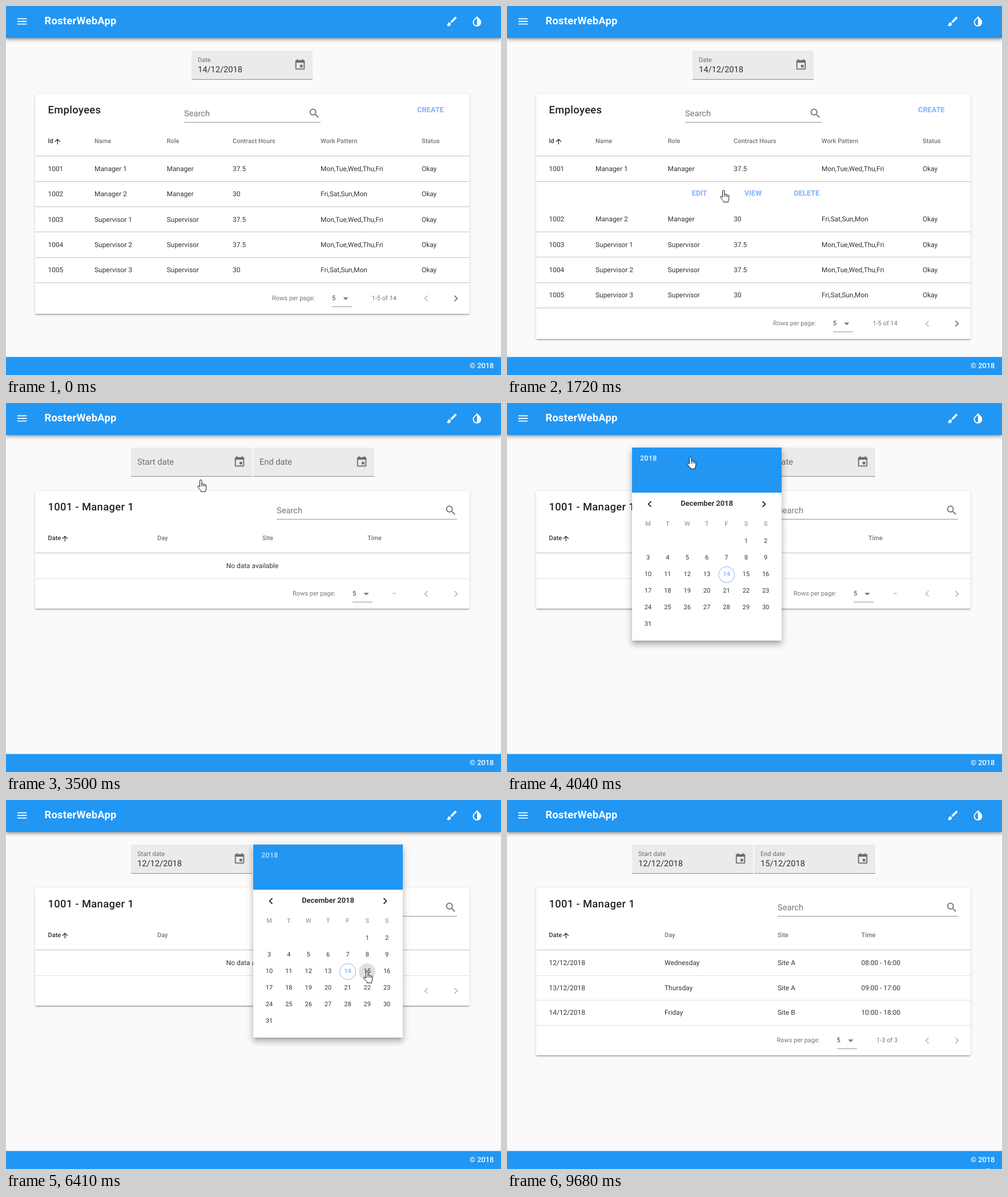
Animation of 867x646 px, one loop 9740 ms. Source, as an HTML page:

```html
<!DOCTYPE html>
<html lang="en">
<head>
<meta charset="utf-8">
<title>RosterWebApp</title>
<style>
  html, body { margin: 0; width: 100%; height: 100%; overflow: hidden; background: #fafafa; }
  #stage { position: relative; width: 867px; height: 646px; overflow: hidden; font-family: Roboto, sans-serif; color: rgba(0,0,0,.8); text-rendering: geometricPrecision; }
  #stage div, #stage svg { position: absolute; }
  .layer { left: 0; top: 0; width: 867px; height: 646px; }
  .text { white-space: pre; line-height: 20px; height: 20px; }
  .bar { background: #2196f3; }
  .top { box-shadow: 0 2px 4px -1px rgba(0,0,0,.26), 0 4px 5px rgba(0,0,0,.16), 0 1px 10px rgba(0,0,0,.12); }
  .bottom { box-shadow: inset 0 1px #86c4f7; }
  .card { background: #fff; border-radius: 2px; box-shadow: 0 3px 1px -2px rgba(0,0,0,.2), 0 2px 2px rgba(0,0,0,.14), 0 1px 5px rgba(0,0,0,.12); }
  .field { background: #ebebeb; border-radius: 4px 4px 0 0; box-shadow: inset 0 -1px #8b8b8b; }
  .picker { background: #fff; border-radius: 2px; transform-origin: 0 0; box-shadow: 0 5px 5px -3px rgba(0,0,0,.2), 0 8px 10px 1px rgba(0,0,0,.14), 0 3px 14px 2px rgba(0,0,0,.12); }
  .title { font-size: 18.33px; font-weight: 500; letter-spacing: .02em; color: rgba(0,0,0,.87); }
  .brand { font-size: 18.33px; font-weight: 700; letter-spacing: .015em; }
  .input { font-size: 14.67px; }
  .button { font-size: 12.83px; font-weight: 700; }
  .note { font-size: 12.83px; font-weight: 500; }
  .cell { font-size: 11.92px; }
  .small { font-size: 11px; }
  .head { font-size: 11px; font-weight: 500; }
  .muted { color: rgba(0,0,0,.54); }
  .faint { color: rgba(0,0,0,.38); }
  .accent { color: #82b1ff; }
  .white { color: #fff; }
  .mid { transform: translateX(-50%); }
  .clip { overflow: hidden; }
  .today { box-sizing: border-box; border: 1px solid #82b1ff; border-radius: 50%; }
  .spot { background: #e0e0e0; border-radius: 50%; }
</style>
</head>
<body>
<div id="stage"></div>
<script>
const LOOP = 9740;
const DARK = 'rgba(0,0,0,.87)', GREY = 'rgba(0,0,0,.54)', PALE = 'rgba(0,0,0,.26)';
const ICONS = {
  menu: 'M3 18h18v-2H3v2zm0-5h18v-2H3v2zm0-7v2h18V6H3z',
  brush: 'M7 14c-1.66 0-3 1.34-3 3 0 1.31-1.16 2-2 2 .92 1.22 2.49 2 4 2 2.21 0 4-1.79 4-4 0-1.66-1.34-3-3-3zm13.71-9.37l-1.34-1.34c-.39-.39-1.02-.39-1.41 0L9 12.25 11.75 15l8.96-8.96c.39-.39.39-1.02 0-1.41z',
  invert: 'M17.66 7.93L12 2.27 6.34 7.93c-3.12 3.12-3.12 8.19 0 11.31C7.9 20.8 9.95 21.58 12 21.58c2.05 0 4.1-.78 5.66-2.34 3.12-3.12 3.12-8.19 0-11.31zM12 19.59c-1.6 0-3.11-.62-4.24-1.76C6.62 16.69 6 15.19 6 13.59s.62-3.11 1.76-4.24L12 5.1v14.49z',
  event: 'M17 12h-5v5h5v-5zM16 1v2H8V1H6v2H5c-1.11 0-1.99.9-1.99 2L3 19c0 1.1.89 2 2 2h14c1.1 0 2-.9 2-2V5c0-1.1-.9-2-2-2h-1V1h-2zm3 18H5V8h14v11z',
  search: 'M15.5 14h-.79l-.28-.27C15.41 12.59 16 11.11 16 9.5 16 5.91 13.09 3 9.5 3S3 5.91 3 9.5 5.91 16 9.5 16c1.61 0 3.09-.59 4.23-1.57l.27.28v.79l5 4.99L20.49 19l-4.99-5zm-6 0C7.01 14 5 11.99 5 9.5S7.01 5 9.5 5 14 7.01 14 9.5 11.99 14 9.5 14z',
  up: 'M4 12l1.41 1.41L11 7.83V20h2V7.83l5.58 5.59L20 12l-8-8-8 8z',
  left: 'M15.41 7.41L14 6l-6 6 6 6 1.41-1.41L10.83 12z',
  right: 'M10 6L8.59 7.41 13.17 12l-4.58 4.59L10 18l6-6z',
  drop: 'M7 10l5 5 5-5z'
};

// ---- building blocks ----
const stage = document.getElementById('stage');

function box(parent, x, y, w, h, cls = '', background = '') {
  const el = document.createElement('div');
  el.className = cls;
  Object.assign(el.style, { left: x + 'px', top: y + 'px', width: w + 'px', height: h + 'px', background });
  return parent.appendChild(el);
}
function layer(parent) {
  return box(parent, 0, 0, 867, 646, 'layer');
}
function text(parent, x, cy, str, cls) {
  const el = document.createElement('div');
  el.className = 'text ' + cls;
  el.textContent = str;
  el.style.left = x + 'px';
  el.style.top = cy - 10 + 'px';
  return parent.appendChild(el);
}
function svg(parent, x, y, w, h, viewBox, content) {
  const el = document.createElementNS('http://www.w3.org/2000/svg', 'svg');
  el.setAttribute('viewBox', viewBox);
  el.innerHTML = content;
  Object.assign(el.style, { left: x + 'px', top: y + 'px', width: w + 'px', height: h + 'px', overflow: 'visible' });
  return parent.appendChild(el);
}
function icon(parent, name, cx, cy, fill, size = 22) {
  return svg(parent, cx - size / 2, cy - size / 2, size, size, '0 0 24 24', `<path d="${ICONS[name]}" fill="${fill}"/>`);
}
function line(parent, y, alpha, x = 51, w = 761) {
  return box(parent, x, y, w, 1, '', `rgba(0,0,0,${alpha})`);
}
function searchBox(parent, x, right) {
  text(parent, x, 188, 'Search', 'input muted');
  line(parent, 203, .42, x, right - x);
  icon(parent, 'search', right - 11, 188, GREY);
}
function dateField(parent, x, label, value) {
  box(parent, x, 78, 211.5, 51, 'field');
  icon(parent, 'event', x + 190, 103, GREY);
  const filled = layer(parent), empty = layer(parent);
  text(filled, x + 11, 95, label, 'small muted');
  text(filled, x + 11, 111, value, 'input');
  text(empty, x + 11, 103, label, 'input muted');
  return has => { show(filled, has); show(empty, !has); };
}
function footer(parent, x, cy, range, nextColor) {
  text(parent, x, cy, 'Rows per page:', 'small muted');
  text(parent, x + 105, cy, '5', 'small');
  line(parent, cy + 14, .42, x + 105, 35);
  icon(parent, 'drop', x + 129, cy, GREY);
  text(parent, x + 174.5, cy, range, 'small muted');
  icon(parent, 'left', 735.5, cy, PALE);
  icon(parent, 'right', 788, cy, nextColor);
}
function header(parent, columns, names) {
  names.forEach((name, i) => text(parent, columns[i], 237, name, i ? 'head muted' : 'head'));
  icon(parent, 'up', names[0] === 'Id' ? 90 : 103, 237, DARK, 14.67);
}
function row(parent, columns, y, cells, height) {
  const back = box(parent, 51, y, 761, height);
  cells.forEach((cell, i) => text(parent, columns[i], y + 22, cell, 'cell'));
  return { back, y, height };
}
function show(el, on) {
  el.style.display = on ? '' : 'none';
}

// ---- employees page ----
const employees = layer(stage);
dateField(employees, 325, 'Date', '14/12/2018')(true);
const staffCard = box(employees, 51, 154, 761, 385, 'card');
text(employees, 73.5, 183, 'Employees', 'title');
text(employees, 720, 183, 'CREATE', 'button accent');
searchBox(employees, 312, 551);
const staffColumns = [73.5, 155, 281.5, 397, 551, 728];
header(employees, staffColumns, ['Id', 'Name', 'Role', 'Contract Hours', 'Work Pattern', 'Status']);
line(employees, 262, .24);

const lower = layer(employees);
const staffRows = ['Manager 1', 'Manager 2', 'Supervisor 1', 'Supervisor 2', 'Supervisor 3'].map((name, i) => {
  const short = i === 1 || i === 4;
  const group = i ? lower : employees;
  const cells = [String(1001 + i), name, name.slice(0, -2), short ? '30' : '37.5',
    short ? 'Fri,Sat,Sun,Mon' : 'Mon,Tue,Wed,Thu,Fri', 'Okay'];
  const item = row(group, staffColumns, 263 + Math.round(44.3 * i), cells, 44);
  line(group, Math.round(262.3 + 44.35 * (i + 1)), .24);
  return item;
});
footer(lower, 466, 512, '1-5 of 14', GREY);

const actions = box(employees, 51, 308, 761, 0, 'clip');
[['EDIT', 337], ['VIEW', 431], ['DELETE', 525]].forEach(([name, cx]) => text(actions, cx - 51, 21, name, 'button accent mid'));

// ---- roster page ----
const roster = layer(stage);
const setStart = dateField(roster, 219, 'Start date', '12/12/2018');
const setEnd = dateField(roster, 433, 'End date', '15/12/2018');
const rosterCard = box(roster, 51, 154, 761, 206, 'card');
text(roster, 73.5, 183, '1001 - Manager 1', 'title');
searchBox(roster, 474, 790);
line(roster, 262, .24);
const rosterHeads = ['Date', 'Day', 'Site', 'Time'];

const blank = layer(roster);
header(blank, [73.5, 265, 449, 633], rosterHeads);
text(blank, 431.5, 285, 'No data available', 'cell mid');
line(blank, 307, .12);
footer(blank, 502, 334, '–', PALE);

const shifts = layer(roster);
const shiftColumns = [73.5, 276, 474, 620.5];
header(shifts, shiftColumns, rosterHeads);
const shiftRows = [['Wednesday', 'Site A'], ['Thursday', 'Site A'], ['Friday', 'Site B']].map(([day, site], i) => {
  const hour = n => String(n + i).padStart(2, '0') + ':00';
  const item = row(shifts, shiftColumns, 263 + Math.round(43.7 * i), [`${12 + i}/12/2018`, day, site, `${hour(8)} - ${hour(16)}`], 44);
  line(shifts, Math.round(306.8 + 43.6 * i), .12);
  return item;
});
footer(shifts, 472.5, 421, '1-3 of 3', PALE);

// ---- date pickers ----
function datePicker(x) {
  const el = box(stage, x, 78, 262, 338, 'picker');
  box(el, 0, 0, 262, 79, 'bar');
  const year = text(el, 14, 20, '2018', 'button white');
  icon(el, 'left', 30.5, 99, DARK);
  icon(el, 'right', 231, 99, DARK);
  text(el, 131, 99, 'December 2018', 'button mid');
  const colX = c => 28 + 34.35 * c;
  [...'MTWTFSS'].forEach((d, c) => text(el, colX(c), 134, d, 'head faint mid'));
  const spot = box(el, 0, 0, 29, 29, 'spot');
  const days = Array.from({ length: 31 }, (_, i) => {
    const cell = i + 5, cx = colX(cell % 7), cy = 164 + 29 * Math.floor(cell / 7);
    const today = i === 13;
    if (today) box(el, cx - 14.5, cy - 14.5, 29, 29, 'today');
    text(el, cx, cy, String(i + 1), today ? 'head accent mid' : 'small mid');
    return [cx, cy];
  });
  return (opacity, scale, yearOpacity, tip) => {
    show(el, opacity > 0);
    el.style.opacity = opacity;
    el.style.transform = scale < 1 ? `scale(${scale})` : 'none';
    year.style.opacity = yearOpacity;
    const day = days.find(([cx, cy]) => Math.hypot(tip.x - x - cx, tip.y - 78 - cy) < 14);
    show(spot, day);
    if (day) Object.assign(spot.style, { left: day[0] - 14.5 + 'px', top: day[1] - 14.5 + 'px' });
  };
}
const setStartPicker = datePicker(219);
const setEndPicker = datePicker(433);

// ---- app bars and cursors ----
box(stage, 0, 0, 867, 56, 'bar top');
icon(stage, 'menu', 28, 27.3, '#fff');
text(stage, 67.5, 27, 'RosterWebApp', 'brand white');
icon(stage, 'brush', 781, 27.3, '#fff');
icon(stage, 'invert', 824.5, 27.3, '#fff');
box(stage, 0, 614, 867, 32, 'bar bottom');
text(stage, 812, 631, '© 2018', 'note white');
const edge = box(stage, 839, 645, 8, 1, '', '#9fcff6');

const ink = 'fill="#fff" stroke="#111" stroke-linejoin="round"';
const arrow = svg(stage, 0, 0, 11, 17, '0 0 11 17', `<path ${ink} d="M.5.5V14.5L3.7 11.5 6 16.6 8.2 15.6 6 10.7H10.4z"/>`);
const hand = svg(stage, -6, 0, 16, 22, '0 0 16 22',
  `<path ${ink} d="M4.5 13V2.2a1.7 1.7 0 0 1 3.4 0V8a1.6 1.6 0 0 1 3 .6 1.5 1.5 0 0 1 2.6.7 1.4 1.4 0 0 1 2.3 1.2v4.2c0 2-1.2 3-1.2 4.6v1.9H6.4v-1.6C4 16.9 1.6 14.6.8 12.4.4 11.2 2 10.4 2.9 11.3z"/>
   <path stroke="#111" fill="none" d="M7.9 8v4M10.9 9v3M13.5 10v2.5"/>`);

// ---- timing ----
// [first step, last step, number of steps]; the picture holds still in between
const BURSTS = [[300, 690, 6], [850, 1160, 5], [1480, 1860, 6], [2090, 2400, 5], [2640, 2870, 4], [3190, 4120, 13],
  [4210, 4600, 6], [4760, 5710, 13], [5770, 6410, 9], [6870, 7190, 5], [7380, 7980, 9], [8360, 8510, 3], [8900, 9280, 6], [9680, 9680, 1]];

// [time, x, y]
const CURSOR = [[300, 694, 574], [690, 423, 287], [1400, 423, 287], [1630, 349, 318], [1860, 437, 330],
  [3110, 437, 330], [3580, 321, 94], [4130, 321, 94], [4600, 320, 309], [4920, 320, 309], [5230, 489, 113],
  [5850, 489, 113], [6410, 632, 299], [7300, 632, 299], [7540, 560, 289], [7980, 411, 379],
  [8285, 411, 379], [8510, 416, 482], [8820, 416, 482], [9204, 842, 620]];

const YEAR_GLOW = [[3960, .6], [4120, .95], [4210, .95], [4290, .6]];

function stepTime(t) {
  const burst = BURSTS.filter(b => b[0] <= t).pop();
  if (!burst) return 0;
  const [start, end, count] = burst;
  if (t >= end) return end;
  const gap = (end - start) / (count - 1);
  return start + Math.floor((t - start + 5) / gap) * gap;
}
function track(keys, t, column = 1) {
  const next = keys.findIndex(k => k[0] > t);
  if (next < 0) return keys[keys.length - 1][column];
  if (next === 0) return keys[0][column];
  const a = keys[next - 1], b = keys[next];
  return a[column] + (b[column] - a[column]) * (t - a[0]) / (b[0] - a[0]);
}
const progress = (t, from, to) => Math.min(1, Math.max(0, (t - from) / (to - from)));
const easeOut = (t, from, to) => 1 - (1 - progress(t, from, to)) ** 3;

function hover(rows, tip, shift, on) {
  rows.forEach(({ back, y, height }, i) => {
    const d = tip.y - y - (i ? shift : 0);
    back.style.background = on && d >= 0 && d < height ? '#eee' : '';
  });
}
function place(page, opacity, x) {
  show(page, opacity > 0);
  page.style.opacity = opacity;
  page.style.transform = x ? `translateX(${x}px)` : 'none';
}

function render(now) {
  const t = stepTime(now);
  const tip = { x: track(CURSOR, t, 1), y: track(CURSOR, t, 2) };
  const visible = t >= 300 && t < 9270;

  const open = Math.round(44 * (1 - (1 - progress(t, 773, 1160)) ** 1.45));
  staffCard.style.height = 385 + open + 'px';
  actions.style.height = open + 'px';
  lower.style.top = open + 'px';
  hover(staffRows, tip, open, visible && t < 2090);

  const leave = easeOut(t, 2012, 2400);
  place(employees, t < 2640 ? 1 - .985 * leave : 0, -13.75 * leave);
  const enter = easeOut(t, 2563, 2870);
  place(roster, enter, -13.75 * (1 - enter));

  const loaded = t >= 6870;
  setStart(t >= 4760);
  setEnd(loaded);
  show(blank, !loaded);
  show(shifts, loaded);
  rosterCard.style.height = (loaded ? 293 : 206) + 'px';
  hover(shiftRows, tip, 0, visible && t >= 7190);

  const grow1 = easeOut(t, 3640, 4040), grow2 = easeOut(t, 5500, 5910);
  setStartPicker(grow1 * (1 - easeOut(t, 4683, 5080)), grow1, track(YEAR_GLOW, t), tip);
  setEndPicker(grow2 * (1 - easeOut(t, 6790, 7190)), grow2, .6, tip);

  const pointing = t >= 1550 && t < 7190;
  show(arrow, visible && !pointing);
  show(hand, visible && pointing);
  arrow.style.transform = hand.style.transform = `translate(${Math.round(tip.x)}px, ${Math.round(tip.y)}px)`;
  show(edge, t >= 9680);
}

const begin = performance.now();
function tick() {
  render((performance.now() - begin) % LOOP);
  requestAnimationFrame(tick);
}
tick();
</script>
</body>
</html>
```
